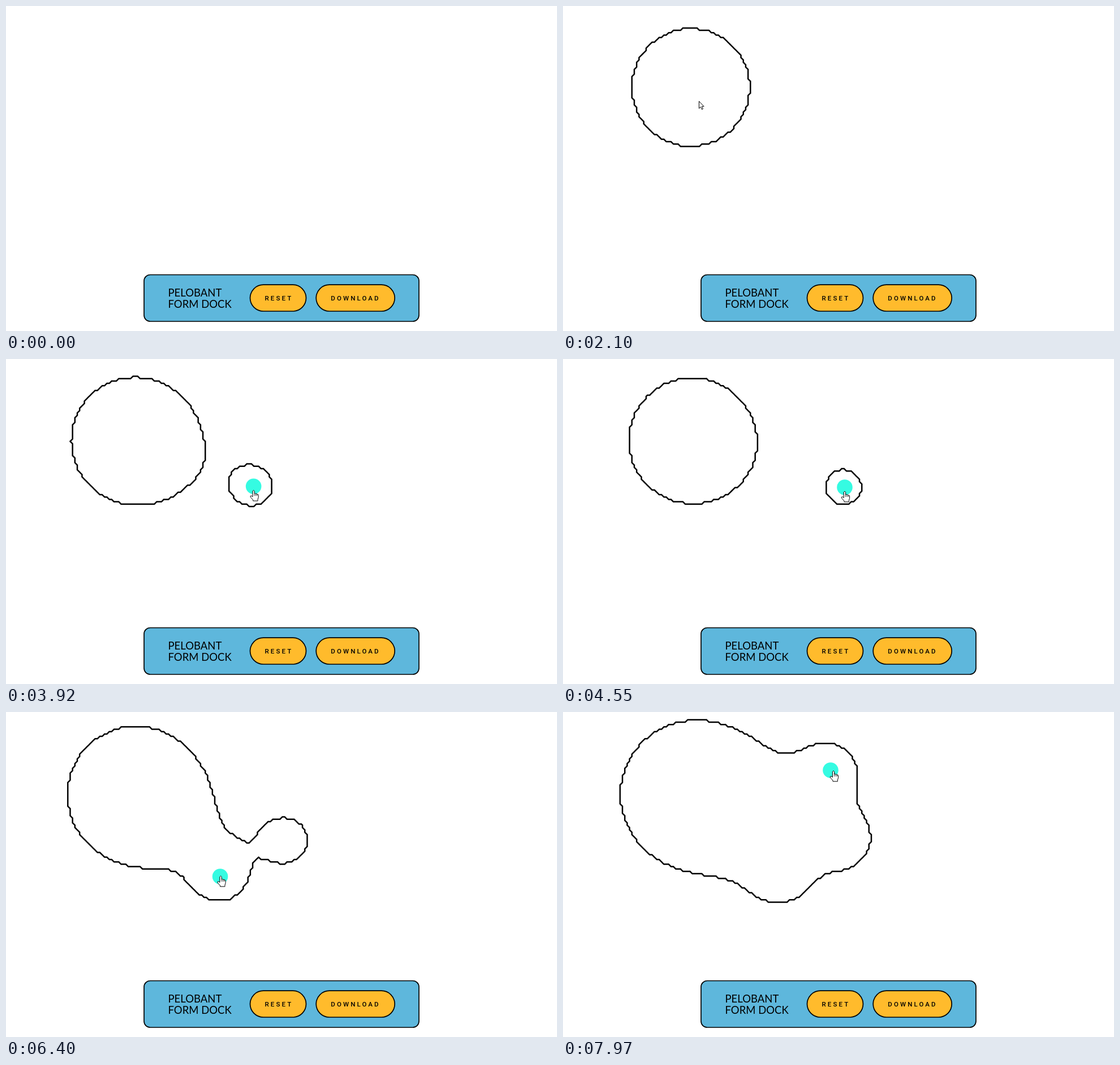
An HTML page that plays this animation: 974 px wide and 575 px high, repeating every 8000 ms.

```html
<!DOCTYPE html>
<html lang="en">
<head>
<meta charset="utf-8">
<title>Blob drawing</title>
<style>
  html, body { margin: 0; width: 100%; height: 100%; overflow: hidden; background: #fff; }
  svg { display: block; width: 100%; height: 100%; }
  .title { font: 400 18.5px Lato, sans-serif; }
  .label { font: 500 11.5px Roboto, sans-serif; letter-spacing: 3.1px; }
</style>
</head>
<body>
<svg viewBox="0 0 974 575">
  <g stroke="#000" stroke-width="1.7">
    <rect x="244" y="475.5" width="486" height="82.5" rx="11" fill="#5eb7dc"/>
    <rect x="431.5" y="493.2" width="99" height="46.8" rx="23.4" fill="#ffbb2c"/>
    <rect x="548.2" y="493.2" width="139" height="46.8" rx="23.4" fill="#ffbb2c"/>
  </g>
  <g class="title">
    <text x="286.5" y="514.3">PELOBANT</text>
    <text x="286.5" y="534">FORM DOCK</text>
  </g>
  <g class="label">
    <text x="457.5" y="521">RESET</text>
    <text x="574.3" y="521">DOWNLOAD</text>
  </g>
  <path id="outline" fill="none" stroke="#000" stroke-width="2.5" stroke-linecap="round"/>
  <circle id="handle" r="13.8" fill="#35fbe2"/>
  <g id="cursor" fill="#fff" stroke="#000" stroke-linejoin="round">
    <circle id="glow" r="10.2" fill="#ff0" fill-opacity=".53" stroke="none"/>
    <path id="arrow" d="M.5.5V13.2L3.4 10.5 5.5 15 7.5 14 5.5 9.7H9.2Z"/>
    <g id="hand">
      <path d="M-1.6 1.5Q0-1.5 1.6 1.5V6Q3.2 5 4.1 6.4Q5.6 5.6 6.4 7Q8.5 6.6 8.6 9V12.5L7.4 16.2V18.8H-1V17L-5.3 12.3Q-6.6 9.6-4 9.7L-1.6 11.4Z"/>
      <path d="M1.6 6V10M4.1 6.5V10M6.4 7V10" fill="none" stroke-width=".8"/>
    </g>
  </g>
</svg>
<script>
const LOOP = 8000;
const CELL = 4.19, LEFT = .3, TOP = 1.2, COLS = 140, ROWS = 95;
const REACH = 15, GLOW_DELAY = 550;
const $ = id => document.getElementById(id);
const [outline, handle, cursor, glow, arrow, hand] =
  ["outline", "handle", "cursor", "glow", "arrow", "hand"].map($);

const entry = { from: 70, x: 916, y: 556 };
const moves = [
  { from: 70, to: 680, x: 234, y: 156 },
  { from: 830, to: 1500, x: 270, y: 202 },
  { from: 2060, to: 2330, x: 163, y: 81 },
  { from: 2330, to: 2860, x: 405, y: 233 },
  { from: 2930, to: 3200, x: 394, y: 231 },
  { from: 3740, to: 4500, x: 498, y: 234 },
  { from: 4600, to: 5200, x: 346, y: 328 },
  { from: 6000, to: 6610, x: 384, y: 285 },
  { from: 6790, to: 7450, x: 478, y: 104 }
];
// A ball follows the pointer, at its grip offset, from grab to drop
const balls = [
  { r: 104, born: 1700, grab: 1700, drop: 1700, grip: [44, 58] },
  { r: 19.5, born: 3200, grab: 3740, drop: 4500, grip: [0, 7] },
  { r: 19.5, born: 5200, grab: 6000, drop: 6610, grip: [1, -1] },
  { r: 19.5, born: 7630, grab: 7630, drop: 7630, grip: [5, 1] }
];

const clamp = (v, lo, hi) => Math.min(hi, Math.max(lo, v));
const easeOut = u => 1 - (1 - u) ** 2;

function pointer(t) {
  let { x, y } = entry;
  for (const m of moves) {
    const k = easeOut(clamp((t - m.from) / (m.to - m.from), 0, 1));
    x += (m.x - x) * k;
    y += (m.y - y) * k;
  }
  return { x, y };
}

function ballAt({ r, grab, drop, grip }, t) {
  const p = pointer(clamp(t, grab, drop));
  return { r, x: p.x - grip[0], y: p.y - grip[1] };
}

// Marching squares with crossings at the edge midpoints
function contour(list) {
  const inside = (i, j) => {
    const x = LEFT + (i + .5) * CELL, y = TOP + (j + .5) * CELL;
    const field = list.reduce((sum, b) => sum + b.r / Math.hypot(x - b.x, y - b.y), 0);
    return field >= 1;
  };
  const grid = Array.from({ length: ROWS }, (_, j) =>
    Array.from({ length: COLS }, (_, i) => inside(i, j)));
  let d = "";
  for (let j = 0; j < ROWS - 1; j++) {
    for (let i = 0; i < COLS - 1; i++) {
      const [a, b] = grid[j].slice(i, i + 2), [e, c] = grid[j + 1].slice(i, i + 2);
      const pts = [];
      const cross = (on, dx, dy) => on && pts.push(
        (LEFT + (i + dx) * CELL).toFixed(2) + " " + (TOP + (j + dy) * CELL).toFixed(2));
      cross(a !== b, 1, .5);
      cross(a !== e, .5, 1);
      cross(b !== c, 1.5, 1);
      cross(e !== c, 1, 1.5);
      for (let k = 0; k < pts.length; k += 2) d += `M${pts[k]}L${pts[k + 1]}`;
    }
  }
  return d;
}

const show = (el, on) => el.setAttribute("visibility", on ? "visible" : "hidden");
const place = (el, p) => el.setAttribute("transform", `translate(${p.x} ${p.y})`);

let shape = "";
function draw(t) {
  const live = balls.filter(b => t >= b.born).map(b => ballAt(b, t));
  const key = JSON.stringify(live);
  if (key !== shape) {
    outline.setAttribute("d", contour(live));
    shape = key;
  }
  const p = pointer(t), seen = t >= entry.from;
  const over = live.find(b => Math.hypot(b.x - p.x, b.y - p.y) < REACH);
  const busy = balls.some(b => t >= b.grab && t < b.drop + GLOW_DELAY);
  if (over) place(handle, over);
  place(cursor, p);
  show(handle, over);
  show(hand, seen && over);
  show(arrow, seen && !over);
  show(glow, seen && !busy);
}

function tick() {
  draw(performance.now() % LOOP);
  requestAnimationFrame(tick);
}
tick();
</script>
</body>
</html>
```
